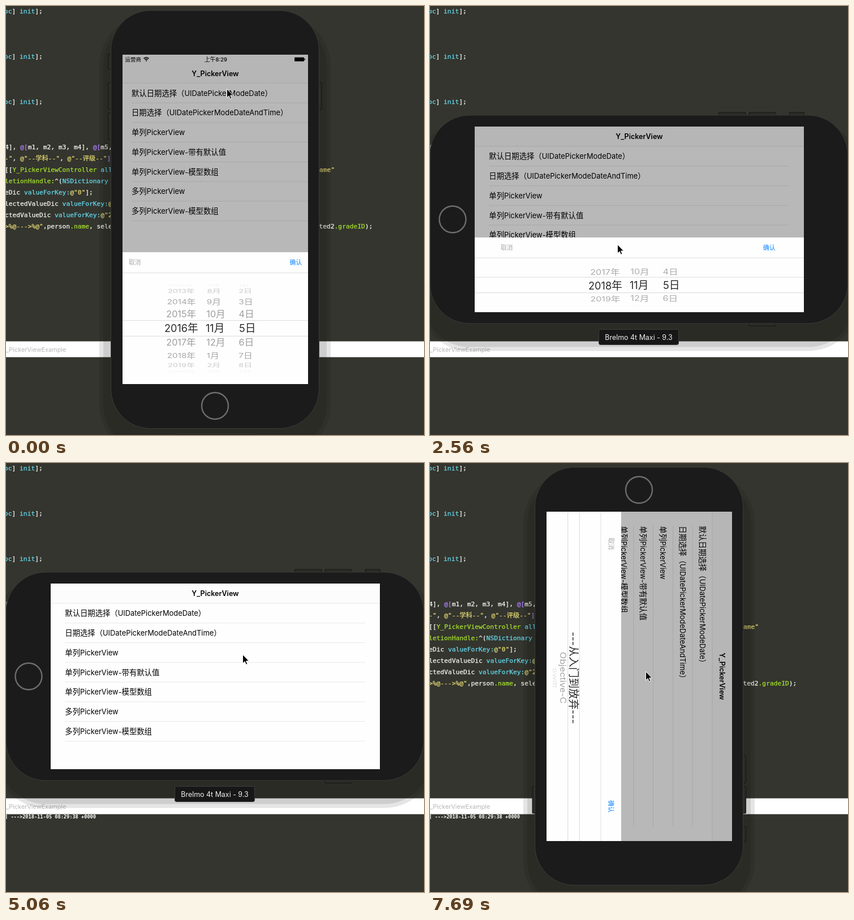
Animation, 739 px wide and 758 px high, one loop 8000 ms. Source, as an HTML page:

```html
<!DOCTYPE html>
<html lang="zh-CN">
<head>
<meta charset="utf-8">
<title>Y_PickerView</title>
<style>
  html, body { margin: 0; width: 100%; height: 100%; overflow: hidden; background: #34352e; }
  svg { display: block; width: 739px; height: 758px; }
  text { font-family: Inter, 'Noto Sans CJK SC', sans-serif; white-space: pre; }
  .cjk { font-family: 'Noto Sans CJK SC', 'Noto Sans CJK JP', sans-serif; }
  .mono { font-family: 'DejaVu Sans Mono', 'Noto Sans CJK SC', monospace; }
</style>
</head>
<body>
<svg viewBox="0 0 739 758" xmlns="http://www.w3.org/2000/svg">
  <defs>
    <clipPath id="screen"><rect id="screenRect"/></clipPath>
    <clipPath id="wheel"><rect id="wheelRect"/></clipPath>
  </defs>
  <g id="editor"></g>
  <g id="console"></g>
  <g id="device"></g>
  <g id="app" clip-path="url(#screen)"></g>
  <g id="tip"></g>
  <path id="cursor" d="M0 0V15.5L3.6 12.2L6.1 17.8L8.5 16.7L6.1 11.4H11Z" fill="#000" stroke="#fff" stroke-width="1"/>
</svg>
<script>
const LOOP = 8000;
const CX = 369.5, CY = 377;      // device centre
const SX = 370, SY = 377;        // screen centre
const LONG = 582, SHORT = 328;
const $ = id => document.getElementById(id);
const lerp = (a, b, k) => a + (b - a) * k;
const clamp = v => Math.max(0, Math.min(1, v));
const smooth = v => { v = clamp(v); return v * v * (3 - 2 * v); };
const wrap = (n, size) => ((n - 1) % size + size) % size + 1;

// Linear interpolation through points [time, ...values]
function track(points, t) {
  let i = points.findIndex(p => p[0] > t);
  if (i < 0) return points[points.length - 1].slice(1);
  if (i === 0) return points[0].slice(1);
  const a = points[i - 1], b = points[i], k = (t - a[0]) / (b[0] - a[0]);
  return a.slice(1).map((v, j) => lerp(v, b[j + 1], k));
}

// Screen refreshes: [first, last, count]
const BURSTS = [
  [0, 0, 1], [120, 120, 1], [260, 500, 3], [730, 730, 1], [1210, 1330, 2],
  [1510, 2090, 6], [2330, 3030, 7], [3150, 3860, 7], [3970, 4330, 4],
  [4480, 5180, 7], [5290, 6010, 7], [6120, 6360, 3], [6590, 6710, 2],
  [6860, 6980, 2], [7690, 7690, 1]
];
const TICKS = BURSTS.flatMap(([from, to, n]) => Array.from({ length: n },
  (_, i) => from + (n > 1 ? Math.floor((to - from) * i / (n - 1) / 10) * 10 : 0)));

const CURSOR = [
  [0, 390, 146], [120, 387, 174], [260, 370, 290], [380, 342, 450], [500, 332, 514],
  [730, 333, 513], [2300, 333, 513], [2440, 332, 455], [2560, 331, 421], [2680, 332, 422],
  [2790, 365, 427], [3030, 486, 427], [3860, 571, 427], [4210, 596, 423], [4600, 596, 423],
  [5060, 418, 338], [5180, 411, 334], [5410, 407, 300], [5640, 402, 310], [6010, 390, 357],
  [6360, 381, 368]
];
const YEAR = [[2200, 2016], [2330, 2016.4], [2440, 2017.4], [2560, 2017.95], [3150, 2018]];
const SHEET = [
  [4600, 1], [4720, .75], [4840, .3], [4950, .05], [5060, 0],
  [6480, 0], [6590, .45], [6710, .9], [6860, .98], [6980, 1]
];

function pose(t) {
  const turn = t < 1210 ? 0 : t < 7690 ? 90 : 180;
  const land = smooth((t - 1430) / 500);
  return {
    turn, land,
    angle: turn === 0 ? 0 : turn === 90 ? 90 * (1 - land) : 90,
    year: track(YEAR, t)[0],
    sheet: track(SHEET, t)[0],
    subjects: t > 6000,
    pressed: t >= 4330 && t < 4480,
    logged: t >= 4720,
    cursor: track(CURSOR, t)
  };
}

const rect = (x, y, w, h, fill, extra = '') =>
  `<rect x="${x}" y="${y}" width="${w}" height="${h}" fill="${fill}" ${extra}/>`;
const hline = (x1, x2, y, color) => rect(x1, y - .5, x2 - x1, 1, color);

// Text centred on y; Latin runs sit slightly smaller than CJK ones
function label(str, x, y, size, extra = '') {
  const runs = str.match(/[\u3000-\uffef]+|[^\u3000-\uffef]+/g).map(run =>
    run.charCodeAt(0) >= 0x3000
      ? `<tspan class="cjk" font-size="${size}">${run}</tspan>`
      : `<tspan font-size="${size * .965}">${run}</tspan>`);
  return `<text x="${x}" y="${y + size * .36}" ${extra}>${runs.join('')}</text>`;
}
const MIDDLE = 'text-anchor="middle"';

const INK = { w: '#f8f8f2', c: '#66d9ef', g: '#a6e22e', y: '#e6db74', p: '#ae81ff' };
// [centre y, x, runs prefixed by their ink]
const CODE = [
  ...[9, 89, 169].map(y => [y, -3, 'coc', 'w] ', 'cinit', 'w];']),
  [249, -2, 'w4], ', 'p@[', 'wm1, m2, m3, m4], ', 'p@[', 'wm5,'],
  [268.5, -2, 'y-"', 'w, ', 'y@"--学科--"', 'w, ', 'y@"--评级--"', 'p]'],
  [289, -2, 'w[[', 'gY_PickerViewController', 'c all'],
  [289, 554, 'yame"'],
  [309, -2, 'gletionHandle:', 'w^(', 'cNSDictionary'],
  [329, -2, 'weDic ', 'cvalueForKey:', 'y@"0"', 'w];'],
  [349, -2, 'wlectedValueDic ', 'cvalueForKey:', 'y@'],
  [369, -2, 'wctedValueDic ', 'cvalueForKey:', 'y@"2'],
  [389, -2, 'y>%@--->%@"', 'w,person', 'g.name', 'w, sele'],
  [389, 553.5, 'wted2', 'g.gradeID', 'w);']
];

$('editor').innerHTML = rect(0, 0, 739, 758, '#34352e') +
  CODE.map(([y, x, ...runs]) =>
    `<text class="mono" font-size="11.25" stroke-width=".25" x="${x}" y="${y + 4}">` + runs.map(r =>
      `<tspan fill="${INK[r[0]]}" stroke="${INK[r[0]]}">${r.slice(1)}</tspan>`).join('') + '</text>').join('') +
  rect(0, 592.5, 739, 28, '#fff') +
  label('_PickerViewExample', 0, 606.5, 11.3, 'fill="#b7b7b7"');
$('console').innerHTML =
  '<text class="mono" font-size="8.65" font-weight="700" fill="#fff" x="-2" y="628">] --->2018-11-05 08:29:38 +0000</text>';

function drawDevice(p) {
  const wide = p.turn === 90;
  const w = wide ? 739 : 369, h = wide ? 369 : 739;
  const key = (x, y, len) => rect(x, y, 6, len, '#2a2a26', 'rx="1" stroke="#151513"');
  const shade = (spread, opacity) => rect(CX - w / 2 - spread, CY - h / 2 + 28 - spread,
    w + spread * 2, h + spread * 2, '#000', `rx="${70 + spread}" opacity="${opacity}"`);
  $('device').innerHTML = shade(20, .1) + shade(13, .1) +
    `<g transform="rotate(${p.turn} ${CX} ${CY})">` +
    key(180.5, 85, 26.5) + key(180.5, 135, 47.5) + key(180.5, 188.5, 47.5) + key(552, 135, 47.5) +
    rect(185.5, 8, 368, 738.5, '#1b1b1b', 'rx="70" stroke="#3b3b39"') +
    `<circle cx="${CX}" cy="706.5" r="23.5" fill="none" stroke="#6d6d6d" stroke-width="2.4"/></g>`;

  const sw = wide ? LONG : SHORT, sh = wide ? SHORT : LONG;
  const box = { x: SX - sw / 2, y: SY - sh / 2, width: sw, height: sh };
  for (const k in box) $('screenRect').setAttribute(k, box[k]);

  const tipY = wide ? 571.5 : 756.5;
  $('tip').innerHTML = rect(298.5, tipY, 141, 27, '#171717', 'rx="3" stroke="#3d3d3d"') +
    label('Brelmo 4t Maxi - 9.3', 369, tipY + 14, 12.9, MIDDLE + ' fill="#f0f0f0"');
}

const ROWS = [
  '默认日期选择（UIDatePickerModeDate）', '日期选择（UIDatePickerModeDateAndTime）',
  '单列PickerView', '单列PickerView-带有默认值', '单列PickerView-模型数组',
  '多列PickerView', '多列PickerView-模型数组'
];
const SUBJECTS = ['---从入门到放弃---', 'Objective-C', 'Swift'];

function statusBar(w) {
  const arc = r => `<path d="M${42 - r * .72} ${11.5 - r * .72}A${r} ${r} 0 0 1 ${42 + r * .72} ${11.5 - r * .72}" fill="none" stroke="#000" stroke-width="1.5"/>`;
  return label('运营商', 4.5, 8.3, 9.5) + arc(6.3) + arc(3.7) +
    '<path d="M42 12L40.6 10.2A2 2 0 0 1 43.4 10.2Z"/>' +
    label('上午8:29', w / 2 + 1, 8.3, 9.7, MIDDLE + ' font-weight="500"') +
    rect(w - 24, 4.7, 17, 7, '#000', 'rx="1.2"') + rect(w - 6.5, 6.7, 1.4, 3, '#000', 'rx=".6"');
}

function wheelColumn(col, value, y0, drum) {
  let out = '';
  const base = Math.round(value);
  for (let n = base - 4; n <= base + 4; n++) {
    const str = col.item(n), off = n - value, a = off * drum.step;
    if (!str || Math.abs(a) > 1.5) continue;
    const dy = drum.radius * Math.sin(a), on = Math.abs(off) < .5;
    const s = on ? 1 : .89 * (1 - .05 * (Math.abs(off) - 1));
    const fade = on ? 1 : clamp(1 - (Math.abs(dy) / drum.reach) ** 4);
    out += `<g transform="translate(${col.x} ${y0 + dy}) scale(${s} ${s * Math.cos(a)})" opacity="${fade}">` +
      label(str, col.left || 0, 0, 18.8,
        (col.left === undefined ? MIDDLE : '') + ` fill="${on ? '#2a2a2a' : '#9c9c9c'}"`) + '</g>';
  }
  return out;
}

function pickerSheet(p, w, h) {
  const k = p.land, mid = w / 2;
  const top = lerp(349, 196, k), bar = top + lerp(36.5, 36, k);
  const band = lerp(p.turn ? 434 : 483.5, 280, k);
  const gap = p.subjects ? 10.3 : 13.8;
  const drum = p.subjects ? { step: .4625, radius: 42.6, reach: 37 }
    : { step: lerp(.3176, .68, k), radius: lerp(80, 37.3, k), reach: lerp(79, 37, k) };
  const cols = p.subjects ? [[{ x: mid + 2.5, item: n => SUBJECTS[n] }, 0]] : [
    [{ x: mid - 60, left: -30, item: n => n + '年' }, p.year],
    [{ x: mid - 5, left: -12, item: n => wrap(n, 12) + '月' }, 11],
    [{ x: mid + 38, left: 4, item: n => wrap(n, 31) + '日' }, 5]
  ];
  const area = { x: 0, y: band - drum.reach, width: w, height: drum.reach * 2 };
  for (const a in area) $('wheelRect').setAttribute(a, area[a]);
  const shown = p.turn === 0 ? 1 : clamp(k * 2 - 1);

  return `<g transform="translate(0 ${(1 - p.sheet) * (h - top)})">` +
    rect(0, top, w, h - top + 1, '#fefefe') +
    label('取消', lerp(11, 46, k), top + 18, 10.8, 'fill="#a8a8a8"') +
    label('确认', w - lerp(11, 50.5, k), top + 18, 10.8,
      `text-anchor="end" fill="#0a84ff" font-weight="500" opacity="${p.pressed ? .2 : 1}"`) +
    hline(0, w, bar, '#dedede') + hline(0, w, band - gap, '#dadada') + hline(0, w, band + gap, '#dadada') +
    `<g clip-path="url(#wheel)" opacity="${shown}">` +
    cols.map(([col, value]) => wheelColumn(col, value, band, drum)).join('') + '</g></g>';
}

function drawApp(p) {
  const k = p.land, w = lerp(SHORT, LONG, k), h = lerp(LONG, SHORT, k);
  const nav = lerp(50.3, 35, k), edge = lerp(16, 25.3, k), pitch = 34.77;
  const line = 'rgba(0,0,0,.09)';
  $('app').innerHTML = rect(0, 0, 739, 758, '#000') +
    `<g transform="translate(${SX} ${SY}) rotate(${p.angle}) translate(${-w / 2} ${-h / 2})">` +
    rect(0, 0, w, h, '#fefefe') + rect(0, 0, w, nav, '#fcfcfc') + hline(0, w, nav, line) +
    `<g opacity="${1 - k}">${statusBar(w)}</g>` +
    label('Y_PickerView', p.turn ? LONG / 2 : w / 2, lerp(33, 17.3, k), 13, MIDDLE + ' font-weight="600"') +
    ROWS.map((row, i) => label(row, edge, nav + 17.5 + i * pitch, 13.35) +
      hline(edge, w - lerp(0, 26, k), nav + (i + 1) * pitch, line)).join('') +
    rect(0, 0, w, h, '#000', `opacity="${.28 * p.sheet}"`) +
    (p.sheet > 0 ? pickerSheet(p, w, h) : '') + '</g>';
}

let shownTick = -1;
function render(time) {
  const t = time % LOOP;
  const tick = TICKS.filter(v => v <= t).pop();
  if (tick === shownTick) return;
  shownTick = tick;
  const p = pose(tick);
  drawDevice(p);
  drawApp(p);
  $('console').style.display = p.logged ? '' : 'none';
  $('cursor').setAttribute('transform', `translate(${p.cursor[0] + .5} ${p.cursor[1] + .5})`);
}

const start = performance.now();
function frame() {
  render(performance.now() - start);
  requestAnimationFrame(frame);
}
frame();
</script>
</body>
</html>
```
